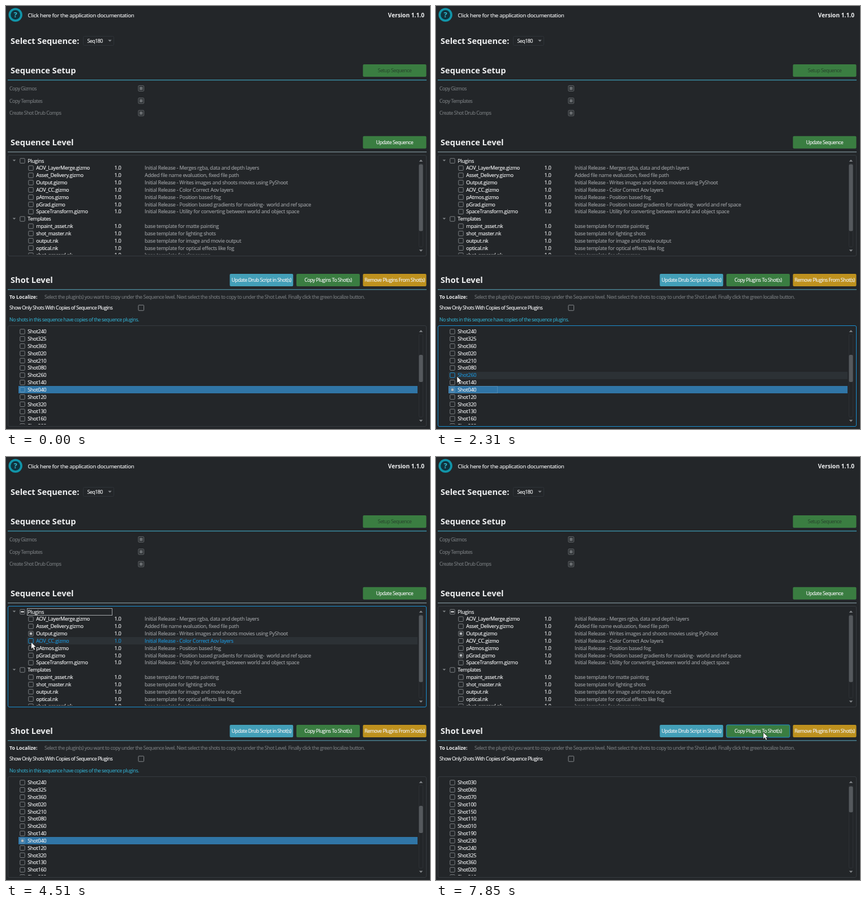
Write an HTML page that moves like this. It is 749 px wide and 747 px high and loops after 8 s.

```html
<!DOCTYPE html>
<html lang="en">
<head>
<meta charset="utf-8">
<title>Plugin manager</title>
<style>
html, body { margin: 0; width: 100%; height: 100%; overflow: hidden; background: #232629; }
svg { display: block; width: 100%; height: 100%; }
text { font-family: "Open Sans", "Noto Sans", sans-serif; fill: currentColor; white-space: pre; }
.head { font-size: 14.6px; font-weight: 700; }
.version { font-size: 10.2px; font-weight: 700; }
.strong { font-size: 8.8px; font-weight: 700; letter-spacing: -.03px; }
.link { font-size: 9.6px; letter-spacing: -.25px; }
.label { font-size: 8.8px; letter-spacing: -.47px; }
.hint { font-size: 8.8px; letter-spacing: -.41px; }
.item { font-size: 9px; letter-spacing: -.22px; }
.link, .label, .hint, .item { stroke: currentColor; stroke-width: .2px; }
</style>
</head>
<body>
<svg id="stage" viewBox="0 0 749 747" preserveAspectRatio="none">
  <defs>
    <clipPath id="pluginClip"><rect x="4" y="265" width="738" height="173.5"/></clipPath>
    <clipPath id="shotClip"><rect x="4" y="567" width="738" height="172"/></clipPath>
  </defs>
</svg>
<script>
const LOOP = 8000, PITCH = 12.83;
const BLUE = '#1b8fd1', BORDER = '#363b40', WHITE = '#eff0f1', MUTED = '#9a9da0', DIM = '#73777a';
const stage = document.getElementById('stage');

function set(el, attrs) {
  for (const key in attrs) el.setAttribute(key, attrs[key]);
  return el;
}
function add(parent, tag, attrs) {
  return parent.appendChild(set(document.createElementNS('http://www.w3.org/2000/svg', tag), attrs));
}
function rect(parent, x, y, width, height, attrs) {
  return add(parent, 'rect', { x, y, width, height, fill: 'none', ...attrs });
}
function text(parent, x, y, cls, value, color = WHITE, anchor = 'start') {
  const el = add(parent, 'text', { x, y, class: cls, color, 'text-anchor': anchor });
  el.textContent = value;
  return el;
}
const show = (el, on) => el.setAttribute('visibility', on ? 'visible' : 'hidden');

function triangle(x, y, size, dir, fill = '#85898c') {
  add(stage, 'path', { d: `M${x - size} ${y - dir * size / 2}h${2 * size}l${-size} ${dir * size}z`, fill });
}
function checkbox(parent, x, y, size, color, checked) {
  const h = size / 2;
  const box = rect(parent, x - h, y - h, size, size, { rx: 1, stroke: color });
  const mark = rect(parent, x - h + 2, y - h + 2, size - 4, size - 4, { fill: color });
  show(mark, checked);
  return { box, mark };
}
function button(x, y, label, fill, color = WHITE) {
  const el = rect(stage, x, y, 112, 22, { rx: 2, fill });
  text(stage, x + 56, y + 14, 'label', label, color, 'middle');
  return el;
}
function section(title, y, lineColor) {
  text(stage, 8, y, 'head', title);
  rect(stage, 3, y + 11, 740, 1.4, { fill: lineColor });
}
function panel(y, trackEnd) {
  const frame = rect(stage, 3.5, y, 739, 178, { rx: 2.5, stroke: BORDER });
  rect(stage, 729.5, y + 15, 7, trackEnd - y - 15, { rx: 2, stroke: '#2d3135' });
  triangle(733, y + 9.5, 3.3, -1);
  triangle(733, trackEnd + 6.5, 3.3, 1);
  return frame;
}

// Header
add(stage, 'circle', { cx: 16.7, cy: 15.6, r: 12.2, fill: '#1295a9' });
add(stage, 'circle', { cx: 16.7, cy: 15.6, r: 8.4, fill: '#10323d' });
text(stage, 16.7, 20, 'version', '?', '#2fbdd2', 'middle').style.fontSize = '12.5px';
text(stage, 38.5, 19.5, 'link', 'Click here for the application documentation');
text(stage, 739, 19.5, 'version', 'Version 1.1.0', WHITE, 'end');
text(stage, 8, 67, 'head', 'Select Sequence:');
rect(stage, 136.5, 53.5, 54, 16, { rx: 2, stroke: '#2e3338' });
text(stage, 143.5, 64.5, 'label', 'Seq180');
triangle(183.5, 61.3, 3.2, 1);

// Sequence setup
section('Sequence Setup', 119, '#3b8fa6');
button(630.5, 103, 'Setup Sequence', '#3a7d41', '#2b4c30');
['Copy Gizmos', 'Copy Templates', 'Create Shot Drub Comps'].forEach((label, i) => {
  const y = 145.5 + i * 21.8;
  text(stage, 6, y + 3.3, 'label', label, DIM);
  checkbox(stage, 238.7, y, 9.6, '#676b6e', true);
});

// Sequence level
section('Sequence Level', 246, '#73868c');
button(630.5, 229.7, 'Update Sequence', '#3a7d41');
const pluginFrame = panel(263.5, 425.5);
rect(stage, 729.5, 279.5, 7, 118, { rx: 2.5, fill: '#55595d' });

// Shot level
section('Shot Level', 489, '#4b8494');
button(395.3, 473, 'Update Drub Script in Shot(s)', '#439fb8');
const copyButton = button(513, 473, 'Copy Plugins To Shot(s)', '#3a7d41');
button(630.5, 473, 'Remove Plugins From Shot(s)', '#be911e');
text(stage, 6, 516.5, 'strong', 'To Localize:');
text(stage, 68, 516.5, 'hint', 'Select the plugin(s) you want to copy under the Sequence level. Next select the shots to copy to under the Shot Level. Finally click the green localize button.', DIM);
text(stage, 6, 536.3, 'label', 'Show Only Shots With Copies of Sequence Plugins');
checkbox(stage, 238.7, 533, 9.6, '#85898c', false);
const message = text(stage, 6, 557.3, 'label', 'No shots in this sequence have copies of the sequence plugins.', '#32a0bd');
const shotFrame = panel(564.5, 726);
const shotThumb = rect(stage, 729.5, 616, 7, 48, { rx: 2.5, fill: '#55595d' });

function makeRow(parent, y, indent, cells) {
  const left = 22 + indent;
  const back = rect(parent, left, Math.round(y - PITCH / 2), 727 - left, 13, {});
  const check = checkbox(parent, left + 7, y, 8.4, '#7d8184', false);
  const labels = cells.map((cell, i) =>
    text(parent, [left + 16.3, 191.5, 245][i], y + 3.2, 'item', cell, i === 2 ? MUTED : WHITE));
  return { y, back, check, labels };
}

const pluginList = add(stage, 'g', { 'clip-path': 'url(#pluginClip)' });
const pluginRows = [
  'Plugins',
  'AOV_LayerMerge.gizmo|Initial Release - Merges rgba, data and depth layers',
  'Asset_Delivery.gizmo|Added file name evaluation, fixed file path',
  'Output.gizmo|Initial Release - Writes images and shoots movies using PyShoot',
  'AOV_CC.gizmo|Initial Release - Color Correct Aov layers',
  'pAtmos.gizmo|Initial Release - Position based fog',
  'pGrad.gizmo|Initial Release - Position based gradients for masking-  world and ref space',
  'SpaceTransform.gizmo|Initial Release - Utility for converting between world and object space',
  'Templates',
  'mpaint_asset.nk|base template for matte painting',
  'shot_master.nk|base template for lighting shots',
  'output.nk|base template for image and movie output',
  'optical.nk|base template for optical effects like fog',
  'shot_precard.nk|base template for slapcomps'
].map((line, i) => {
  const [name, note] = line.split('|');
  const y = 273.4 + i * PITCH;
  if (!note) triangle(14.5, y - .5, 2.8, 1);
  return makeRow(pluginList, y, note ? 15 : 0, note ? [name, '1.0', note] : [name]);
});
const partialMark = rect(pluginList, 26.2, 272.4, 5.6, 2, { fill: WHITE });
const pluginFocus = rect(pluginList, 37.5, 267.5, 150, 12, { stroke: '#a3a7aa' });

const shots = '030 060 070 100 150 110 010 190 230 240 325 360 020 210 080 260 140 040 120 320 130 160 200'.split(' ');
const shotList = add(stage, 'g', { 'clip-path': 'url(#shotClip)' });
const shotRows = Array.from({ length: 14 }, (_, i) => makeRow(shotList, 575 + i * PITCH, 0, ['']));
const shotFocus = rect(shotList, 22.5, 671.5, 86, 12, { stroke: '#6b9dc0', 'stroke-dasharray': '1 1' });

const ring = add(stage, 'g', {});
add(ring, 'circle', { r: 8.5, fill: 'none', stroke: '#000' });
add(ring, 'circle', { r: 7.5, fill: 'none', stroke: '#fff' });
const pointer = add(stage, 'path', {
  d: 'M0 0V12.2L2.8 9.6 4.7 14 6.9 13 5 8.8H8.8Z', fill: '#fff', stroke: '#111', 'stroke-width': .7
});

// Pointer moves: start, end, steps, then the points passed
const moves = [
  [70, 840, 11, [150, 738], [95, 712], [50, 682], [33, 672]],
  [920, 920, 1, [30.5, 673]],
  [1150, 1150, 1, [29.7, 674]],
  [2240, 2630, 6, [37, 654], [62, 560], [88, 455], [100, 415]],
  [2940, 3640, 10, [104, 340], [85, 315], [62, 300], [46, 309], [43, 313]],
  [3870, 3870, 1, [42.6, 314.3]],
  [4420, 4750, 5, [43, 318], [46, 336], [47, 349]],
  [4890, 4970, 2, [46.3, 350], [45.6, 350.3]],
  [6000, 6600, 9, [60, 354], [180, 385], [370, 435], [520, 474], [578, 485]],
  [7850, 7850, 1, [578, 486]]
];

function pointerAt(t) {
  const move = moves.filter(m => m[0] <= t).pop();
  if (!move) return null;
  const [start, end, steps, ...points] = move;
  const done = end > start ? Math.min(1, (t - start) / (end - start)) : 1;
  const u = Math.floor(done * (steps - 1) + 1e-6) / Math.max(1, steps - 1) * (points.length - 1);
  const i = Math.min(Math.floor(u), points.length - 1);
  const a = points[i], b = points[i + 1] || a;
  return a.map((v, k) => v + (b[k] - v) * (u - i));
}

function paintRow(row, hover, selected, checked) {
  set(row.back, { fill: selected ? '#3075a6' : hover ? '#2c3135' : 'none' });
  row.labels.forEach((label, i) =>
    set(label, { color: hover ? (selected ? '#203a4e' : BLUE) : i === 2 ? MUTED : WHITE }));
  set(row.check.box, { stroke: hover ? (selected ? '#a5cde6' : BLUE) : selected ? '#6c9cbd' : '#7d8184' });
  set(row.check.mark, { fill: hover ? '#4eaee3' : '#b4b8bb' });
  show(row.check.mark, checked);
}

function draw(t) {
  const at = pointerAt(t);
  const [x, y] = at || [-99, -99];
  const within = (top, bottom) => x > 3 && x < 743 && y > top && y < bottom;
  const overRow = row => x > 22 && x < 727 && Math.abs(y - row.y) < PITCH / 2;
  const overPlugins = within(264, 441), overShots = within(565, 743);
  const refreshed = t >= 7150;
  const shotFocused = t >= 1390 && t < 4100;
  const pluginFocused = t >= 4100 && t < 7000;

  set(pluginFrame, { stroke: overPlugins || pluginFocused ? BLUE : BORDER });
  set(shotFrame, { stroke: overShots || shotFocused ? BLUE : BORDER });
  set(copyButton, { stroke: x > 513 && x < 625 && y > 473 && y < 495 ? BLUE : 'none' });

  pluginRows.forEach((row, i) =>
    paintRow(row, overPlugins && overRow(row), false, i === 3 && t >= 4270 || i === 6 && t >= 5440));
  show(partialMark, t >= 4270);
  show(pluginFocus, pluginFocused);

  shotRows.forEach((row, i) => {
    const selected = i === 8 && !refreshed;
    row.labels[0].textContent = 'Shot' + shots[i + (refreshed ? 0 : 9)];
    paintRow(row, overShots && overRow(row), selected, selected && t >= 1540);
  });
  show(shotFocus, shotFocused);
  set(shotThumb, refreshed ? { y: 581.5, height: 46 } : { y: 616, height: 48 });
  show(message, !refreshed);

  const pressed = [[1390, 1540], [4100, 4270], [5270, 5440], [7000, 7150]].some(([a, b]) => t >= a && t < b);
  show(ring, pressed);
  set(ring, { transform: `translate(${x} ${y})` });
  show(pointer, at);
  set(pointer, { transform: `translate(${x} ${y})` });
}

const begin = performance.now();
function frame() {
  draw((performance.now() - begin) % LOOP);
  requestAnimationFrame(frame);
}
frame();
</script>
</body>
</html>
```
